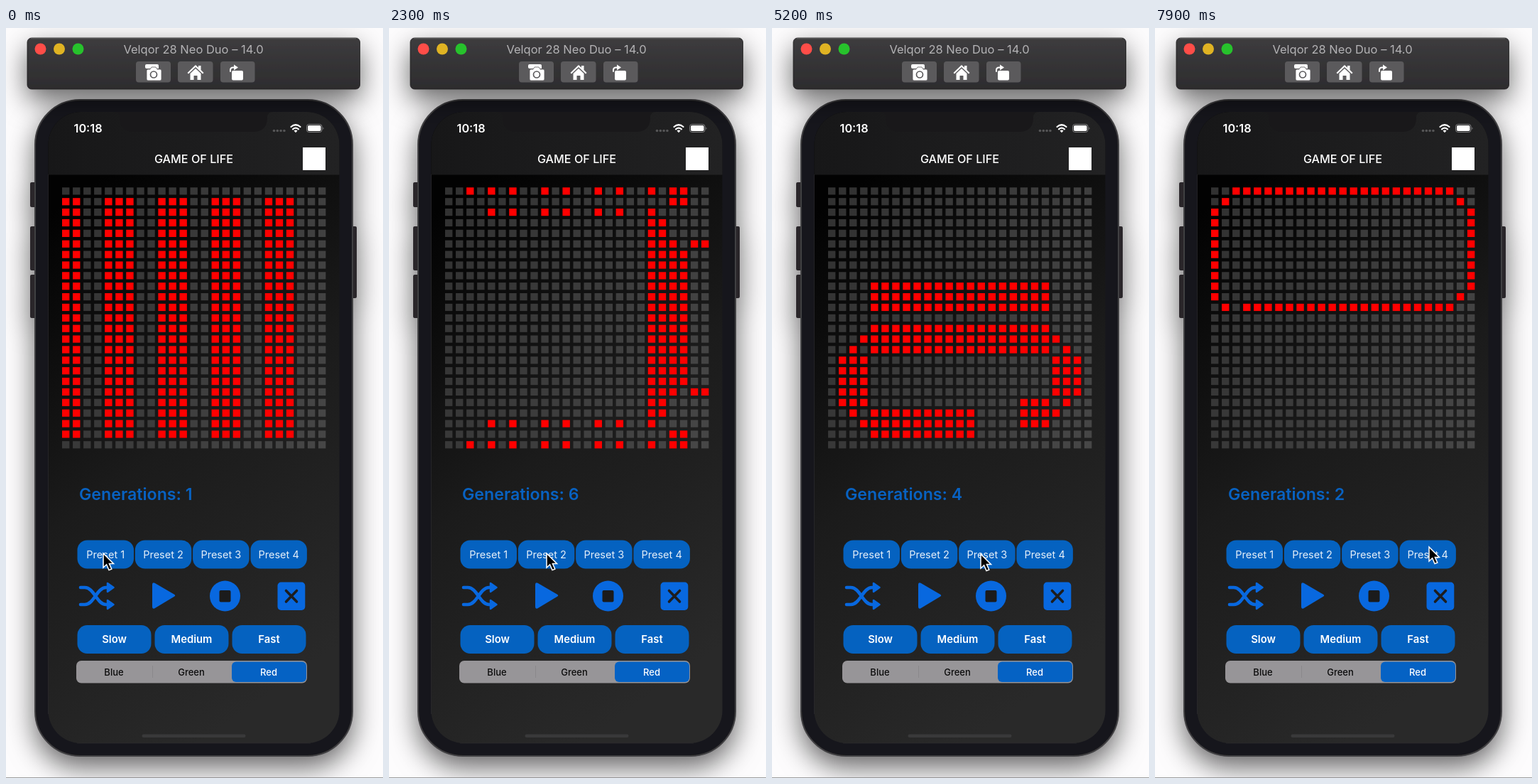
Write an HTML page that moves like this. It is 531 px wide and 1055 px high and loops after 8000 ms.

```html
<!DOCTYPE html>
<html lang="en">
<head>
<meta charset="utf-8">
<title>Game of Life</title>
<style>
  html, body { margin: 0; width: 100%; height: 100%; overflow: hidden; background: #fdfcfd; }
  svg { display: block; }
  text { font-family: Inter, sans-serif; fill: #fff; }
  .mid { text-anchor: middle; }
  .icon { fill: #0868df; }
  .line { fill: none; stroke-linecap: round; stroke-linejoin: round; }
</style>
</head>
<body>
<svg width="531" height="1055" viewBox="0 0 531 1055">
  <defs>
    <linearGradient id="bar" x2="0" y2="1">
      <stop stop-color="#3d3c3e"/><stop offset="1" stop-color="#2d2c2e"/>
    </linearGradient>
    <linearGradient id="screen" gradientUnits="userSpaceOnUse" x1="60" y1="260" x2="480" y2="860">
      <stop stop-color="#020202"/><stop offset=".5" stop-color="#1b1b1b"/><stop offset="1" stop-color="#292929"/>
    </linearGradient>
    <linearGradient id="nav">
      <stop stop-color="#171718"/><stop offset="1" stop-color="#222223"/>
    </linearGradient>
    <filter id="shadow" x="-30%" y="-60%" width="160%" height="240%">
      <feDropShadow dx="0" dy="15" stdDeviation="19" flood-color="#000" flood-opacity=".6"/>
    </filter>
    <clipPath id="glass"><rect x="59.500" y="118" width="410" height="888" rx="46"/></clipPath>
  </defs>

  <!-- phone body -->
  <g filter="url(#shadow)">
    <g fill="#29282a">
      <rect x="34" y="217" width="10" height="35" rx="2"/>
      <rect x="34" y="279" width="10" height="62" rx="2"/>
      <rect x="34" y="347" width="10" height="61" rx="2"/>
      <rect x="484" y="279" width="10" height="101" rx="2"/>
    </g>
    <rect x="41" y="101" width="447" height="923" rx="63" fill="#19181a" stroke="#403f42" stroke-width="2"/>
  </g>

  <!-- window bar -->
  <rect x="30" y="14" width="468.500" height="72" rx="6" fill="url(#bar)" stroke="#1d1c1e" stroke-width=".8" filter="url(#shadow)"/>
  <path d="M35 14.800H493" stroke="#626163"/>
  <circle cx="48.500" cy="29.500" r="8" fill="#ff4d48"/>
  <circle cx="75" cy="29.500" r="8" fill="#e0b323"/>
  <circle cx="101.500" cy="29.500" r="8" fill="#27c22c"/>
  <text class="mid" x="264" y="35.500" font-size="16.500" style="fill:#b3b2b4">Velqor 28 Neo Duo – 14.0</text>
  <g fill="#5b5a5c">
    <rect x="183" y="47" width="49" height="29.500" rx="4"/>
    <rect x="242" y="47" width="49.500" height="29.500" rx="4"/>
    <rect x="302" y="47" width="48.500" height="29.500" rx="4"/>
  </g>
  <g fill="#fff">
    <path d="M198 51h15q2 0 2 2v4h-17q-2 0-2-2v-2q0-2 2-2z"/>
    <path d="M200 58h3l2-3h6l2 3h4q2 0 2 2v12q0 2-2 2h-17q-2 0-2-2v-12q0-2 2-2z" stroke="#5b5a5c" stroke-width=".8"/>
    <circle cx="208" cy="65.500" r="4.500" fill="none" stroke="#5b5a5c" stroke-width="1.700"/>
    <path d="M255.500 63l11.500-11 4 3.800V53h3.500v6l4 4-1.500 1.500-10-9.500-10 9.500z"/>
    <path d="M259.500 64l7.500-7 7.500 7v9h-5v-6h-5v6h-5z"/>
    <rect x="318" y="60" width="16" height="13.500" rx="2"/>
    <path class="line" d="M316 61v-2q0-3.500 4-3.500h2" stroke="#fff" stroke-width="2" style="fill:none"/>
    <path d="M321 51.500l6 4-6 4z"/>
  </g>

  <!-- screen -->
  <g clip-path="url(#glass)">
    <rect x="59" y="118" width="411" height="889" fill="url(#screen)"/>
    <rect x="59" y="118" width="411" height="88.500" fill="url(#nav)"/>
    <path d="M152 118q8 0 8 8q0 20 20 20H348q20 0 20-20q0-8 8-8z" fill="#19181a"/>
  </g>
  <path d="M59.500 206V965M100 1006H429" stroke="#333234" stroke-width=".8" opacity=".7"/>
  <text x="95.500" y="147" font-size="16.300" font-weight="600">10:18</text>
  <text class="mid" x="264.500" y="190" font-size="16.200" font-weight="500">GAME OF LIFE</text>
  <g fill="#565657">
    <circle cx="377.500" cy="144.500" r="1.800"/><circle cx="382.300" cy="144.500" r="1.800"/>
    <circle cx="387.100" cy="144.500" r="1.800"/><circle cx="391.900" cy="144.500" r="1.800"/>
  </g>
  <path class="line" d="M401.500 139q6.500-5.500 13 0M404 142.300q4-3.300 8 0" stroke="#fff" stroke-width="2.200"/>
  <path d="M405.500 144.500q2.500-2 5 0l-2.500 2.800z" fill="#fff"/>
  <rect x="423.500" y="135.500" width="21.500" height="11" rx="3.200" fill="none" stroke="#858586"/>
  <rect x="425" y="137" width="18.500" height="8" rx="1.800" fill="#fff"/>
  <path d="M446.500 139.500q2 1.500 0 3.500z" fill="#858586"/>
  <rect x="418" y="168" width="32" height="32" fill="#fff"/>

  <g id="cells"></g>
  <text id="counter" x="103" y="663.500" font-size="23.200" font-weight="600" style="fill:#0862c2"></text>
  <g id="buttons"></g>

  <!-- transport icons -->
  <path class="line" d="M105 787h6c13 0 17 24 30 24h4M105 811h6c13 0 17-24 30-24h4" stroke="#0868df" stroke-width="4.600"/>
  <path class="icon line" d="M143 781v12l8.500-6zM143 805v12l8.500-6z" stroke="#0868df" stroke-width="2.500" style="fill:#0868df"/>
  <path class="icon" d="M206 783q0-4 3.500-2.300l27.500 16q2.500 1.500 0 3l-27.500 16.500q-3.500 1.700-3.500-2.200z"/>
  <circle class="icon" cx="308.500" cy="799" r="21.500"/>
  <rect x="300.500" y="791" width="16" height="16.500" rx="2" fill="#1b1b1c"/>
  <rect class="icon" x="382.500" y="779.500" width="38.800" height="39.500" rx="5"/>
  <path class="line" d="M394.500 791.500l15 15.500M409.500 791.500l-15 15.500" stroke="#1d1d1e" stroke-width="3.600"/>

  <!-- colour picker -->
  <rect x="99" y="890" width="325" height="31.500" rx="7" fill="#979598"/>
  <path d="M206.500 897v17" stroke="#8a888b"/>
  <rect x="318" y="891.500" width="105" height="28.500" rx="6" fill="#0562c4"/>
  <g class="mid" font-size="13" font-weight="500">
    <text x="152" y="910.500" style="fill:#0b0b0b">Blue</text>
    <text x="261" y="910.500" style="fill:#0b0b0b">Green</text>
    <text x="370" y="910.500">Red</text>
  </g>
  <rect x="191.500" y="993.500" width="146" height="4.500" rx="2.200" fill="#39393a"/>
  <path d="M0 1054.500H531" stroke="#777" opacity=".7"/>
  <path id="cursor" d="M0 0V20L4.600 15.800L8 23.600L11.800 22L8.400 14.400H14.500Z" fill="#000" stroke="#fff" stroke-width="1.500"/>
</svg>

<script>
const LOOP = 8000, FRAME = 100, SIZE = 25;
const TICK = 510, PHASE = 345;

// Each preset fills cells by running index; `base` is the timer tick it starts on.
const presets = [
  { click: 0, base: -1, alive: i => i % 5 === 0 },
  { click: 3000, base: 6, alive: i => i % 2 === 0 && i >= 300 && i <= 614 },
  { click: 7250, base: 14, alive: i => i % 3 === 0 && i <= 300 },
];

// time, x, y of the pointer tip
const pointer = [
  [0, 137, 739], [1500, 137, 739], [2100, 222, 739], [3400, 222, 739],
  [4200, 264, 739], [5000, 294, 740], [5300, 294, 740], [5900, 306, 738],
  [7300, 306, 738], [7800, 386, 730], [LOOP, 386, 730],
];

const byId = id => document.getElementById(id);

function add(parent, tag, attributes, content = '') {
  const node = document.createElementNS('http://www.w3.org/2000/svg', tag);
  for (const key in attributes) node.setAttribute(key, attributes[key]);
  node.textContent = content;
  return parent.appendChild(node);
}

function addButton(label, x, y, width, font) {
  add(byId('buttons'), 'rect', { x, y, width, height: 40, rx: 14, fill: '#0562c0' });
  add(byId('buttons'), 'text', { x: x + width / 2, y: y + 25, class: 'mid', ...font }, label);
}

for (let i = 0; i < 4; i++)
  addButton(`Preset ${i + 1}`, 100.5 + i * 81.3, 720.5, 79.5, { 'font-size': 14.5, opacity: 0.9 });
['Slow', 'Medium', 'Fast'].forEach((label, i) =>
  addButton(label, 100.5 + i * 109, 840, 104, { 'font-size': 14.8, 'font-weight': 600 }));

const cells = Array.from({ length: SIZE * SIZE }, (_, i) => add(byId('cells'), 'rect', {
  x: 79 + (i % SIZE) * 15.04,
  y: 224.3 + Math.floor(i / SIZE) * 14.87,
  width: 10.4, height: 10.2,
}));

function nextGeneration(grid) {
  return grid.map((alive, i) => {
    const col = i % SIZE, row = Math.floor(i / SIZE);
    let neighbours = 0;
    for (let r = Math.max(0, row - 1); r <= Math.min(SIZE - 1, row + 1); r++)
      for (let c = Math.max(0, col - 1); c <= Math.min(SIZE - 1, col + 1); c++)
        if ((r !== row || c !== col) && grid[r * SIZE + c]) neighbours++;
    return neighbours === 3 || (alive && neighbours === 2);
  });
}

let shown = '';
function showGrid(preset, generation) {
  const key = `${preset.click}/${generation}`;
  if (key === shown) return;
  shown = key;
  let grid = cells.map((_, i) => preset.alive(i));
  for (let n = 0; n < generation; n++) grid = nextGeneration(grid);
  cells.forEach((cell, i) => {
    const grey = 49 + (i % SIZE) * 0.6 + Math.floor(i / SIZE) * 0.3;
    cell.setAttribute('fill', grid[i] ? '#f00' : `rgb(${grey},${grey},${grey})`);
  });
  byId('counter').textContent = `Generations: ${generation}`;
}

function movePointer(time) {
  const k = pointer.findIndex(([end]) => end > time);
  const [t0, x0, y0] = pointer[k - 1], [t1, x1, y1] = pointer[k];
  const u = (time - t0) / (t1 - t0), ease = u * u * (3 - 2 * u);
  byId('cursor').setAttribute('transform',
    `translate(${x0 + (x1 - x0) * ease} ${y0 + (y1 - y0) * ease})`);
}

function draw(now) {
  const time = Math.floor((now % LOOP) / FRAME) * FRAME;
  const preset = presets.filter(p => p.click <= time).pop();
  showGrid(preset, Math.floor((time + PHASE) / TICK) - preset.base);
  movePointer(time);
}

const start = performance.now();
function loop() {
  draw(performance.now() - start);
  requestAnimationFrame(loop);
}
loop();
</script>
</body>
</html>
```
